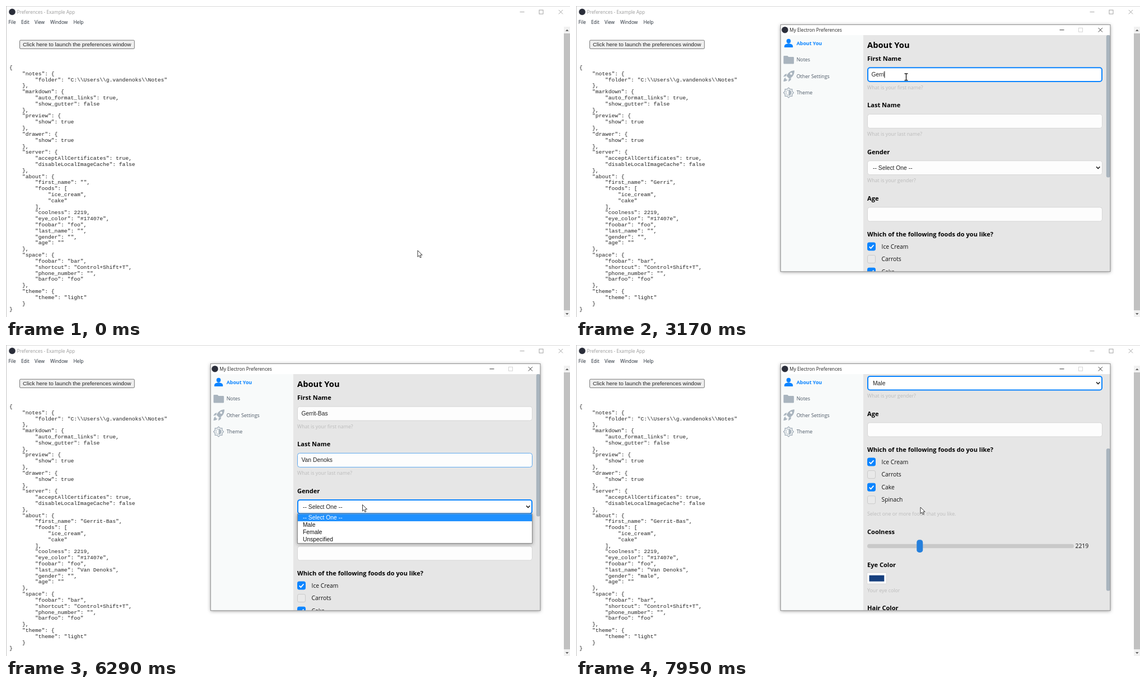
An HTML page that plays this animation: 1007x556 px, repeating every 8000 ms.

```html
<!DOCTYPE html>
<html lang="en">
<head>
<meta charset="utf-8">
<title>Preferences</title>
<style>
  html, body { margin: 0; width: 100%; height: 100%; overflow: hidden; background: #fff; }
  svg { display: block; }
  text { white-space: pre; font-family: "Open Sans", sans-serif; }
  .mono { font: 9.6px "Liberation Mono", monospace; fill: #222; }
  .arial { font: 10.33px "Liberation Sans", sans-serif; fill: #222; }
  .bar { font-size: 8.3px; }
  .title { font-size: 14.7px; font-weight: 700; }
  .label { font-size: 11.07px; font-weight: 700; }
  .hint { font-size: 8.86px; fill: #bbb; }
  .option { font-size: 10.33px; fill: #111; }
  .nav { font-size: 8.86px; font-weight: 500; fill: #4c5866; }
  .shadow { filter: drop-shadow(0 1px 3px rgba(0, 0, 0, .38)); }
</style>
</head>
<body>
<svg id="stage" width="1007" height="556" viewBox="0 0 1007 556"></svg>
<script>
const LOOP = 8000;
const BLUE = '#0a84ff', GREY = '#a9b4be';
const FIRST = 'Gerrit-Bas', LAST = 'Van Denoks';
const OPTIONS = ['-- Select One --', 'Male', 'Female', 'Unspecified'];
const FIELD_Y = { first: 122.6, last: 205.9, gender: 289.2, age: 372.4 };

// Stepped tracks: [time, value]
const FIRST_TYPED = [[0, 0], [2750, 1], [2860, 2], [2970, 3], [3070, 4], [3170, 5],
  [3280, 6], [3400, 7], [3620, 8], [3840, 10]];
const LAST_TYPED = [[0, 0], [4270, 1], [4600, 2], [4720, 4], [4940, 5], [5050, 6],
  [5160, 7], [5280, 9], [5500, 10]];
const SCROLL = [[0, 0], [7390, 8], [7500, 42], [7610, 77.6], [7720, 122], [7830, 178], [7950, 221]];

// Pointer moves: start, end, steps, destination x and y
const MOVES = [
  [100, 660, 6, 145, 76], [1210, 1740, 6, 553, 129], [1860, 1980, 2, 589.5, 126.7],
  [5730, 6180, 5, 636.5, 285.5], [6400, 6510, 2, 637, 303], [6630, 6830, 3, 640, 320],
  [7050, 7270, 3, 641.5, 306], [7830, 7950, 2, 615, 290]
];

const stage = document.getElementById('stage');
const pen = document.createElement('canvas').getContext('2d');

const valueAt = (track, t) => track.filter(k => k[0] <= t).pop()[1];
const during = (t, from, to) => t >= from && t < to;

function pointerAt(t) {
  let x = 735, y = 437;
  for (const [start, end, steps, toX, toY] of MOVES) {
    if (t < start) break;
    const done = Math.floor((t - start) / (end - start) * (steps - 1) + 1e-6) + 1;
    const f = Math.min(1, done / steps), eased = f * f * (3 - 2 * f);
    x += (toX - x) * eased;
    y += (toY - y) * eased;
  }
  return { x, y };
}

// 0 = none, 1 = fading, 2 = full
function focusLevel(t, from, to) {
  if (!during(t, from, to + 110)) return 0;
  return t < from + 110 || t >= to ? 1 : 2;
}

const escapeText = s => s.replace(/&/g, '&amp;').replace(/</g, '&lt;');
const text = (x, y, cls, s, fill) =>
  `<text x="${x}" y="${y}" class="${cls}"${fill ? ` style="fill:${fill}"` : ''}>${escapeText(s)}</text>`;
const rect = (x, y, w, h, fill, extra = '') =>
  `<rect x="${x}" y="${y}" width="${w}" height="${h}" fill="${fill}" ${extra}/>`;
const path = (d, fill, extra = '') => `<path d="${d}" fill="${fill}" ${extra}/>`;
const line = (d, color, width = 1) => path(d, 'none', `stroke="${color}" stroke-width="${width}"`);
const dot = (x, y, r, fill) => `<circle cx="${x}" cy="${y}" r="${r}" fill="${fill}"/>`;

// Minimise, maximise and close glyphs, centred on three x positions
const windowControls = (min, max, close, y, color, maxColor = color) =>
  line(`M${min - 4} ${y}h8M${close - 3.7} ${y - 3.7}l7.4 7.4m0 -7.4l-7.4 7.4`, color, .9) +
  rect(max - 3.5, y - 3.5, 7, 7, 'none', `stroke="${maxColor}" stroke-width=".9"`);

function settings(first, last, gender) {
  return JSON.stringify({
    notes: { folder: 'C:\\Users\\g.vandenoks\\Notes' },
    markdown: { auto_format_links: true, show_gutter: false },
    preview: { show: true },
    drawer: { show: true },
    server: { acceptAllCertificates: true, disableLocalImageCache: false },
    about: {
      first_name: first, foods: ['ice_cream', 'cake'], coolness: 2219, eye_color: '#17407e',
      foobar: 'foo', last_name: last, gender, age: ''
    },
    space: { foobar: 'bar', shortcut: 'Control+Shift+T', phone_number: '', barfoo: 'foo' },
    theme: { theme: 'light' }
  }, null, 4).split('\n');
}

function mainWindow(s) {
  const chrome = s.active ? '#000' : '#999';
  const menu = [['File', 4.5], ['Edit', 27], ['View', 51], ['Window', 79], ['Help', 120.5]];
  return rect(0, 0, 1007, 556, '#fff') +
    line('M.5 0V556', '#c4c4c4') + line('M0 .4H1007', '#c8c8c8', .8) +
    dot(11, 10.5, 5.8, '#2b2e3a') +
    text(19.5, 14, 'bar', 'Preferences - Example App', chrome) +
    windowControls(921.5, 955.5, 990.5, 10.7, chrome) +
    menu.map(([name, x]) => text(x, 32, 'bar', name, '#1c2530')).join('') +
    rect(996, 37, 11, 519, '#f1f1f1') + rect(996, 49, 11, 495, '#c1c1c1') +
    path('M999 45l2.8 -3.2 2.8 3.2zM999 549l2.8 3.2 2.8 -3.2z', '#606060') +
    rect(24.5, 61.2, 204.8, 15.2, s.hover ? '#e4e4e4' : '#efefef',
      `rx="1.5" stroke="${s.hover ? '#555' : '#767676'}"`) +
    `<text x="30" y="72" class="arial" style="font-size:9.87px">Click here to launch the preferences window</text>` +
    settings(s.first, s.last, s.gender ? 'male' : '')
      .map((row, i) => text(6, (113 + i * 10.81).toFixed(2), 'mono', row)).join('');
}

function field(y, value, focus, caret) {
  const full = focus === 2;
  const x = 527.5;
  pen.font = '10.33px "Liberation Sans", sans-serif';
  const end = x + pen.measureText(value).width + .5;
  const box = full
    ? rect(521, y - 12.3, 418, 24.6, '#fff', `rx="4" stroke="${BLUE}" stroke-width="2"`)
    : rect(520.5, y - 12.5, 419, 25, '#fdfdfd', `rx="4" stroke="${focus ? '#5ea9ee' : '#d6d6d6'}"`);
  return box + text(x, y + 3.5, 'arial', value) +
    (caret ? line(`M${end} ${y - 6}v12`, '#000', .9) : '');
}

function checkbox(y, name, on) {
  return rect(520.5, y - 7, 14, 14, on ? BLUE : '#e9e9e9', `rx="2.5" stroke="${on ? BLUE : '#cacaca'}"`) +
    (on ? line(`M523.7 ${y + .3}l2.7 2.9 5 -5.8`, '#fff', 1.8) : '') +
    text(545.5, y + 3.6, 'option', name);
}

function sidebar() {
  const star = (r, fill) => [0, 45].map(a =>
    rect(379.6 - r, 155 - r, 2 * r, 2 * r, fill, `rx=".6" transform="rotate(${a} 379.6 155)"`)).join('');
  const names = ['About You', 'Notes', 'Other Settings', 'Theme'];
  return rect(366, 52, 147, 422.5, '#f8fafa') +
    `<ellipse cx="379.6" cy="62.8" rx="3.8" ry="4.1" fill="${BLUE}"/>` +
    path('M372 74v-2.4c0-2.9 4-4.4 7.6-4.4s7.6 1.5 7.6 4.4v2.4z', BLUE) +
    path('M371.8 89h5.8l2 2.1h8.2q1.3 0 1.3 1.3v9.8q0 1.3-1.3 1.3h-16q-1.3 0-1.3-1.3V90.3q0-1.3 1.3-1.3z', GREY) +
    path('M390 115.2c-6.3 .2-11.3 3.7-14.2 9.8l5 5c6-2.8 9.3-8 9.2-14.8z', GREY) +
    path('M376.8 121.3l-3.6 .6-3.2 4.5 4.6-.7zM384.2 128.7l-.6 3.6-4.4 3.3 .6-4.8z', GREY) +
    path('M374.3 127.8c-2.6 .8-3.5 3.6-3.8 7.2 3.6-.3 6.4-1.2 7.3-3.8l-2.4 .7 .4-1.8-1.9 .3z', GREY) +
    dot(384.2, 121.1, 2, '#f8fafa') +
    star(7, GREY) + star(5.6, '#f8fafa') +
    line('M379.6 150.3a4.7 4.7 0 0 0 0 9.4', GREY, 1) +
    path('M379.6 149.8a5.2 5.2 0 0 1 0 10.4z', GREY) +
    names.map((name, i) => `<text x="393.7" y="${69.8 + i * 29.5}" class="nav"` +
      (i ? '' : ` style="fill:${BLUE};font-weight:700"`) + `>${name}</text>`).join('');
}

function form(s) {
  const label = (y, name) => text(520, y + 4, 'label', name);
  const hint = (y, name) => text(520, y + 3.1, 'hint', name);
  const { first, last, gender, age } = FIELD_Y;
  const foods = ['Ice Cream', 'Carrots', 'Cake', 'Spinach'];
  return text(520, 74.5, 'title', 'About You') +
    label(94, 'First Name') + field(first, s.first, s.focus.first, s.caret === 'first') +
    hint(145.6, 'What is your first name?') +
    label(177.3, 'Last Name') + field(last, s.last, s.focus.last, s.caret === 'last') +
    hint(228.9, 'What is your last name?') +
    label(260.6, 'Gender') + field(gender, '', s.focus.gender) +
    text(530, gender + 3.5, 'arial', OPTIONS[s.gender]) +
    line(`M929 ${gender - 1.8}l3.2 3.2 3.2 -3.2`, '#222', 1.5) +
    hint(312.3, 'What is your gender?') +
    label(343.9, 'Age') + field(age, '', 0) +
    (s.over === 'age' ? path(`M925 ${age - 1.4}l3 -3.6 3 3.6zM925 ${age + 1.4}l3 3.6 3 -3.6z`, '#555') : '') +
    label(407.8, 'Which of the following foods do you like?') +
    foods.map((name, i) => checkbox(430 + i * 22.6, name, i % 2 === 0)).join('') +
    hint(523.2, 'Select one or more foods that you like.') +
    label(554.8, 'Coolness') +
    rect(520, 576.7, 369, 7.6, '#c9c9c9', 'rx="3.8"') +
    rect(608.3, 569.3, 11, 22.6, '#2680dc', 'rx="4.5"') +
    text(891.5, 584.2, 'option', '2219') +
    label(614.2, 'Eye Color') +
    rect(519.7, 628, 34.6, 20, '#fff', 'rx="1" stroke="#d0d0d0" stroke-width=".8"') +
    rect(523.5, 632.7, 26.8, 11, '#17407e') +
    hint(659.8, 'Your eye color') +
    label(691, 'Hair Color');
}

function dropdown(s) {
  return '<g class="shadow">' + rect(520.5, 302, 419, 52.6, '#fff', 'stroke="#777" stroke-width=".8"') + '</g>' +
    rect(521, 302.3 + s.option * 13, 418, 12.8, '#1e90ff') +
    OPTIONS.map((name, i) => text(530, 311.9 + i * 12.95, 'arial', name, i === s.option ? '#fff' : '#111')).join('');
}

function preferences(s) {
  const scale = s.opening ? 'transform="translate(659.5 254) scale(.988) translate(-659.5 -254)"' : '';
  const body = !s.loaded ? rect(366, 52, 588, 422.5, '#ebebeb') :
    rect(513, 52, 441, 422.5, '#e6e6e6') + sidebar() +
    `<svg x="513" y="52" width="441" height="422.5" viewBox="513 ${52 + s.scroll} 441 422.5">${form(s)}</svg>` +
    rect(946.8, 52 + s.scroll * .602, 7, 254.5, GREY, 'rx="3"');
  return `<g ${scale}><g class="shadow">` + rect(365.3, 33.4, 588.6, 441.4, '#fff') + '</g>' +
    dot(373, 42.7, 5.8, '#2b2e3a') +
    text(381.3, 46.2, 'bar', 'My Electron Preferences', '#222') +
    windowControls(867.5, 901, 936.3, 42.8, '#222', '#d0d0d0') + body +
    rect(365.3, 33.4, 588.6, 441.4, 'none', 'stroke="#858585" stroke-width=".9"') + '</g>';
}

function pointer({ x, y }, beam) {
  const shape = beam
    ? line('M-3 -5.8h2.3l.7 .7 .7 -.7h2.3M0 -5.3v11M-3 6.2h2.3l.7 -.7 .7 .7h2.3', '#000', 1.2)
    : path('M0 0V11.4L2.6 9 4.4 13 6.3 12.2 4.6 8.2H8.2Z', '#fff', 'stroke="#222" stroke-width=".9"');
  return `<g transform="translate(${x} ${y})">${shape}</g>`;
}

function stateAt(t) {
  const at = pointerAt(t), scroll = valueAt(SCROLL, t), loaded = t >= 1100;
  const over = loaded && at.x > 520 && at.x < 940 &&
    Object.keys(FIELD_Y).find(name => Math.abs(at.y - FIELD_Y[name] + scroll) < 12.8);
  return {
    at, scroll, loaded, over,
    active: during(t, 780, 890),
    shown: t >= 890,
    opening: t < 990,
    hover: at.x > 24 && at.x < 229 && at.y > 61 && at.y < 77,
    first: FIRST.slice(0, valueAt(FIRST_TYPED, t)),
    last: LAST.slice(0, valueAt(LAST_TYPED, t)),
    gender: t >= 7050 ? 1 : 0,
    focus: {
      first: focusLevel(t, 2200, 4060),
      last: focusLevel(t, 4060, 6290),
      gender: focusLevel(t, 6180, LOOP)
    },
    caret: during(t, 2200, 4060) ? 'first' : during(t, 4060, 6180) ? 'last' : '',
    open: during(t, 6290, 7050),
    option: at.y > 315 ? 1 : 0
  };
}

let drawn = '';
function render(t) {
  const s = stateAt(t), key = JSON.stringify(s);
  if (key === drawn) return;
  drawn = key;
  const beam = ['first', 'last', 'age'].includes(s.over);
  stage.innerHTML = mainWindow(s) + (s.shown ? preferences(s) : '') +
    (s.open ? dropdown(s) : '') + pointer(s.at, beam);
}

const start = performance.now();
function tick() {
  render((performance.now() - start) % LOOP);
  requestAnimationFrame(tick);
}
tick();
</script>
</body>
</html>
```
